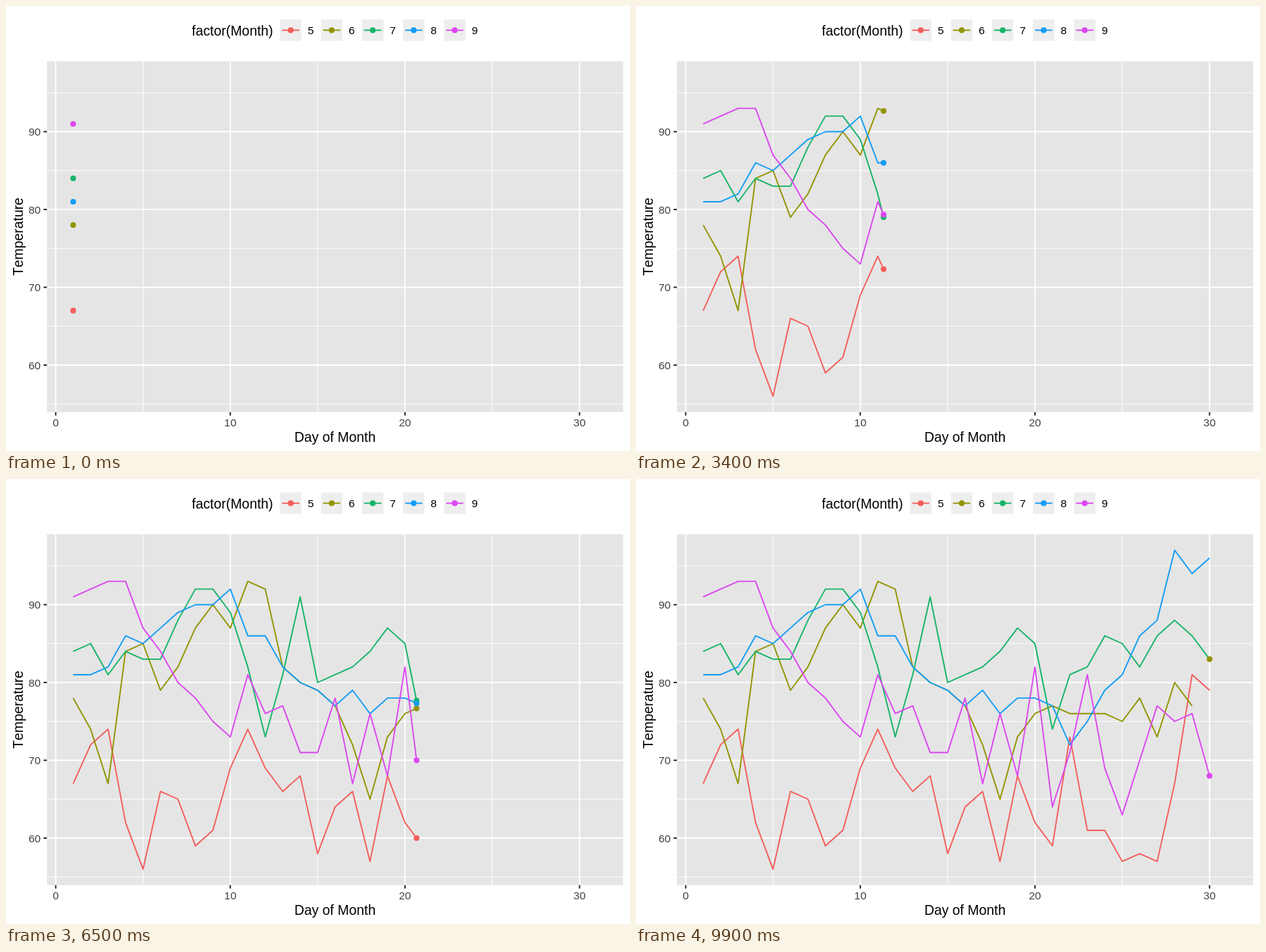
An HTML page with a canvas that plays this animation: 885x632 px, repeating every 10000 ms.

```html
<!DOCTYPE html>
<html lang="en">
<head>
<meta charset="utf-8">
<title>Daily temperature by month</title>
<style>
html, body { margin: 0; width: 100%; height: 100%; overflow: hidden; background: #fff; }
canvas { display: block; }
</style>
</head>
<body>
<canvas id="chart" width="885" height="632"></canvas>
<script>
const ctx = document.getElementById('chart').getContext('2d');
const STEP = 100, FRAMES = 100;
const LEFT = 58.1, RIGHT = 875.3, TOP = 78.5, BOTTOM = 576.8;
const LINE = 1.88;

const series = [
  { month: 5, color: '#f35e5a', temps: [67, 72, 74, 62, 56, 66, 65, 59, 61, 69, 74, 69, 66, 68, 58, 64, 66, 57, 68, 62, 59, 73, 61, 61, 57, 58, 57, 67, 81, 79, 76] },
  { month: 6, color: '#929400', temps: [78, 74, 67, 84, 85, 79, 82, 87, 90, 87, 93, 92, 82, 80, 79, 77, 72, 65, 73, 76, 77, 76, 76, 76, 75, 78, 73, 80, 77, 83] },
  { month: 7, color: '#17b469', temps: [84, 85, 81, 84, 83, 83, 88, 92, 92, 89, 82, 73, 81, 91, 80, 81, 82, 84, 87, 85, 74, 81, 82, 86, 85, 82, 86, 88, 86, 83, 81] },
  { month: 8, color: '#149df5', temps: [81, 81, 82, 86, 85, 87, 89, 90, 90, 92, 86, 86, 82, 80, 79, 77, 79, 76, 78, 78, 77, 72, 75, 79, 81, 86, 88, 97, 94, 96, 94] },
  { month: 9, color: '#db47ef', temps: [91, 92, 93, 93, 87, 84, 80, 78, 75, 73, 81, 76, 77, 71, 71, 78, 67, 76, 68, 82, 64, 71, 81, 69, 63, 70, 77, 75, 76, 68] }
];

const xOf = day => 70.5 + 24.765 * day;
const yOf = temp => 289 - 11.05 * (temp - 80);

function line(points, color, width) {
  ctx.beginPath();
  points.forEach(([x, y]) => ctx.lineTo(x, y));
  ctx.strokeStyle = color;
  ctx.lineWidth = width;
  ctx.stroke();
}

function dot(x, y, color) {
  ctx.beginPath();
  ctx.arc(x, y, 4.05, 0, 2 * Math.PI);
  ctx.fillStyle = color;
  ctx.fill();
}

function box(x, y, w, h, color) {
  ctx.fillStyle = color;
  ctx.fillRect(x, y, w, h);
}

function text(str, x, y, size, align = 'center', color = '#000') {
  ctx.font = size + 'px "Liberation Sans", Arial, sans-serif';
  ctx.textAlign = align;
  ctx.fillStyle = color;
  ctx.fillText(str, x, y);
}

const vLine = (day, width) => line([[xOf(day), TOP], [xOf(day), BOTTOM]], '#fff', width);
const hLine = (temp, width) => line([[LEFT, yOf(temp)], [RIGHT, yOf(temp)]], '#fff', width);

function drawGrid() {
  box(0, 0, 885, 632, '#fff');
  box(LEFT, TOP, RIGHT - LEFT, BOTTOM - TOP, '#e5e5e5');
  [55, 65, 75, 85, 95].forEach(t => hLine(t, LINE / 2));
  [5, 15, 25].forEach(d => vLine(d, LINE / 2));
  [60, 70, 80, 90].forEach(t => hLine(t, LINE));
  [0, 10, 20, 30].forEach(d => vLine(d, LINE));
}

function drawAxes() {
  for (const t of [60, 70, 80, 90]) {
    line([[LEFT - 4.85, yOf(t)], [LEFT, yOf(t)]], '#222', LINE);
    text(t, 49.2, yOf(t) + 5.6, 15.5, 'right', '#404040');
  }
  for (const d of [0, 10, 20, 30]) {
    line([[xOf(d), BOTTOM], [xOf(d), BOTTOM + 4.85]], '#222', LINE);
    text(d, xOf(d), 596.6, 15.5, 'center', '#404040');
  }
  text('Day of Month', 466.6, 618.8, 19.4);
  ctx.save();
  ctx.translate(23.8, 327.6);
  ctx.rotate(-Math.PI / 2);
  text('Temperature', 0, 0, 19.4);
  ctx.restore();
}

function drawLegend() {
  text('factor(Month)', 263.5, 41.6, 19.4, 'left');
  series.forEach(({ month, color }, i) => {
    const x = 388.6 + 58.15 * i, y = 34.4;
    box(x, y - 15.2, 30.4, 30.4, '#eee');
    line([[x + 3, y], [x + 27.4, y]], color, LINE);
    dot(x + 15.2, y, color);
    text(month, x + 39.3, 40, 15.5, 'left');
  });
}

// Each day starts on a whole step, ties rounding to the even one.
const dayStep = i => Math.round(i * 33 / 10 - (i % 20 === 5 ? 0.1 : 0));

function dayIndex(step) {
  let i = 0;
  while (i < 29 && dayStep(i + 1) <= step) i++;
  return i + (step - dayStep(i)) / (dayStep(i + 1) - dayStep(i));
}

function drawSeries(step) {
  const pos = dayIndex(step);
  const dots = [];
  for (const { month, color, temps } of series) {
    const last = temps.length - 1;
    const p = Math.min(pos, last);
    const at = i => {
      const a = Math.floor(i), b = Math.min(a + 1, last);
      return [xOf(i + 1), yOf(temps[a] + (temps[b] - temps[a]) * (i - a))];
    };
    // A finished month loses its final segment, except the last month.
    const done = pos >= last;
    const end = done && month !== 9 ? last - 1 : p;
    const points = [];
    for (let i = 0; i < end; i++) points.push(at(i));
    points.push(at(end));
    line(points, color, LINE);
    if (!done || last < 30) dots.push([...at(p), color]);
  }
  dots.forEach(d => dot(...d));
}

function draw() {
  drawGrid();
  drawSeries(Math.floor(performance.now() / STEP) % FRAMES);
  drawAxes();
  drawLegend();
  requestAnimationFrame(draw);
}

ctx.lineJoin = 'round';
ctx.fontKerning = 'none';
draw();
</script>
</body>
</html>
```
